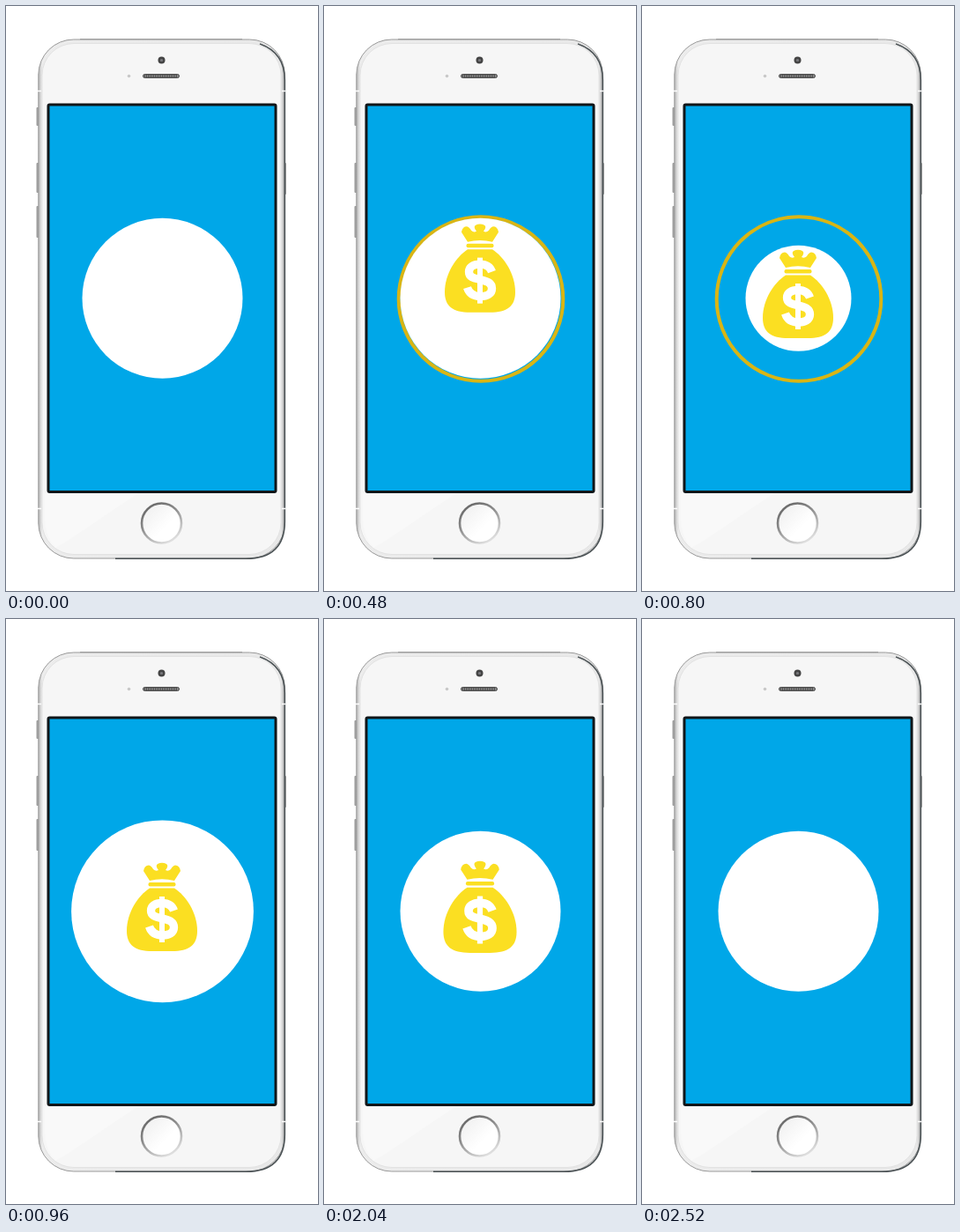
Write an HTML page that moves like this. It is 354 px wide and 664 px high and loops after 2.88 s.

```html
<!DOCTYPE html>
<html lang="en">
<head>
<meta charset="utf-8">
<title>Money bag on a phone</title>
<style>
  html, body { margin: 0; width: 100%; height: 100%; overflow: hidden; background: #fff; }
  svg { display: block; width: 354px; height: 664px; }
</style>
</head>
<body>
<svg viewBox="0 0 354 664">
  <defs>
    <linearGradient id="rim" x1="0" x2="1" y1="0" y2="0">
      <stop offset="0" stop-color="#b4b4b4"/>
      <stop offset=".015" stop-color="#ececec"/>
      <stop offset=".985" stop-color="#e8e8e8"/>
      <stop offset="1" stop-color="#a8a8a8"/>
    </linearGradient>
    <linearGradient id="button" x1=".2" x2=".8" y1="0" y2="1">
      <stop offset="0" stop-color="#666"/>
      <stop offset=".4" stop-color="#8c8c8c"/>
      <stop offset="1" stop-color="#e8e8e8"/>
    </linearGradient>
    <linearGradient id="dish" x1="0" x2="1" y1="0" y2="1">
      <stop offset="0" stop-color="#ededed"/>
      <stop offset=".6" stop-color="#fff"/>
    </linearGradient>
    <filter id="soft" x="-5%" y="-5%" width="110%" height="110%">
      <feGaussianBlur stdDeviation=".6"/>
    </filter>
  </defs>

  <!-- phone -->
  <g fill="#a0a0a0">
    <rect x="34.500" y="115" width="3" height="21" rx="1"/>
    <rect x="34.500" y="178" width="3" height="34" rx="1"/>
    <rect x="34.500" y="227" width="3" height="36" rx="1"/>
    <rect x="315" y="178" width="3" height="36" rx="1"/>
  </g>
  <rect x="36.800" y="38" width="279.500" height="589" rx="40" fill="url(#rim)" stroke="#999"/>
  <path d="M84 37.700H268" stroke="#999"/>
  <path d="M288 43Q316.300 53 316.300 84V585Q316.300 627.300 272 627.300H124" fill="none" stroke="#4c5356" stroke-width="1.600"/>
  <rect x="41" y="42.500" width="271" height="580" rx="36" fill="#f6f6f6" stroke="#e2e2e2"/>
  <path d="M48 553H150L70 607L56 615Q45 604 44 582V553Z" fill="#f9f9f9"/>
  <path d="M36 96.500H40M313 96.500H317M36 570.500H40M313 570.500H317" stroke="#fff" stroke-width="1.500"/>
  <circle cx="176.500" cy="61.500" r="4" fill="#444"/>
  <circle cx="176.500" cy="61.500" r="1.600" fill="#79797d"/>
  <circle cx="139.500" cy="79.500" r="1.800" fill="#c8c8c8"/>
  <rect x="155.500" y="77.500" width="41" height="4" rx="2" fill="#8a8a8a" stroke="#444"/>
  <path d="M157 79.500H195" stroke="#333" stroke-width="2" stroke-dasharray="1 1"/>
  <circle cx="176.500" cy="587" r="22.500" fill="url(#dish)" stroke="url(#button)" stroke-width="2.600"/>
  <rect x="48" y="112" width="258" height="439.500" rx="1.500" fill="#00a7e8" stroke="#101619" stroke-width="3"/>

  <!-- screen content -->
  <circle id="ring" cx="178" cy="332.500" r="93.300" fill="none" stroke="#d9b514" stroke-width="4"
          pathLength="100" transform="rotate(-90 178 332.500)"/>
  <circle id="disc" cx="177.500" cy="331.800" r="91" fill="#fff" filter="url(#soft)"/>
  <g id="bag" fill="#fbdf22">
    <path d="M163 297L156 286Q157 279.500 162 279.500Q165 280 167 284Q170 287 173 285Q169 280 172 278Q177 275.500 182 278Q185 280 181 285Q184 287 187 284Q189 280 192 279.500Q197 279.500 198 286L191 297Q177 293.500 163 297Z"/>
    <rect x="161.500" y="299" width="31" height="4.500" rx="2"/>
    <path d="M163 305.500H191C204 314 217 333 217 354C217 370 208 377 188 377H166C146 377 137 370 137 354C137 333 150 314 163 305.500Z"/>
    <g fill="none" stroke="#fff">
      <path d="M190.500 331C188 324 183 322.500 177 322.500C169 322.500 164.500 326 164.500 331C164.500 338 172 338.500 178 340C186 342 190.500 344 190.500 350C190.500 356 185 359 177.500 359C169 359 164.500 355 162.500 349" stroke-width="9.300"/>
      <path d="M177 315V367" stroke-width="6"/>
    </g>
  </g>
</svg>
<script>
const LOOP = 2880;
const PIVOT = { x: 177, y: 327 };
const [ring, disc, bag] = ["ring", "disc", "bag"].map(id => document.getElementById(id));

const mix = (a, b, k) => a + (b - a) * k;
const progress = (t, start, end) => Math.min(1, Math.max(0, (t - start) / (end - start)));
const easeOut = x => 1 - (1 - x) ** 2.6;

// cubic-bezier(.42, 0, .58, 1)
function easeInOut(x) {
  let low = 0, high = 1, u = 0.5;
  for (let i = 0; i < 20; i++) {
    u = (low + high) / 2;
    const bx = 1.26 * u * (1 - u) ** 2 + 1.74 * u * u * (1 - u) + u ** 3;
    if (bx < x) low = u; else high = u;
  }
  return u * u * (3 - 2 * u);
}

const ramp = (t, start, end, from, to, ease = easeInOut) =>
  mix(from, to, ease(progress(t, start, end)));

function discRadius(t) {
  if (t < 800) return ramp(t, 560, 800, 91, 59.5);
  if (t < 1040) return ramp(t, 800, 1040, 59.5, 106, easeOut);
  return ramp(t, 1040, 1200, 106, 91);
}

function bagScale(t) {
  return t < 2200 ? ramp(t, 2000, 2200, 1, 1.45) : ramp(t, 2200, 2520, 1.45, 0);
}

function draw(t) {
  const drawn = ramp(t, 0, 400, 0, 100);
  ring.setAttribute("stroke-dasharray", drawn > 99.9 ? "none" : `${drawn} 200`);
  ring.setAttribute("visibility", t > 0 && t < 960 ? "visible" : "hidden");

  disc.setAttribute("r", discRadius(t));

  const { x, y } = PIVOT;
  const drop = ramp(t, 400, 560, -60, 0);
  bag.setAttribute("transform", `translate(${x} ${y + drop}) scale(${bagScale(t)}) translate(${-x} ${-y})`);
  bag.setAttribute("opacity", progress(t, 400, 470));
  bag.setAttribute("visibility", t > 400 && t < 2520 ? "visible" : "hidden");
}

const began = performance.now();
function tick() {
  draw((performance.now() - began) % LOOP);
  requestAnimationFrame(tick);
}
draw(0);
requestAnimationFrame(tick);
</script>
</body>
</html>
```
